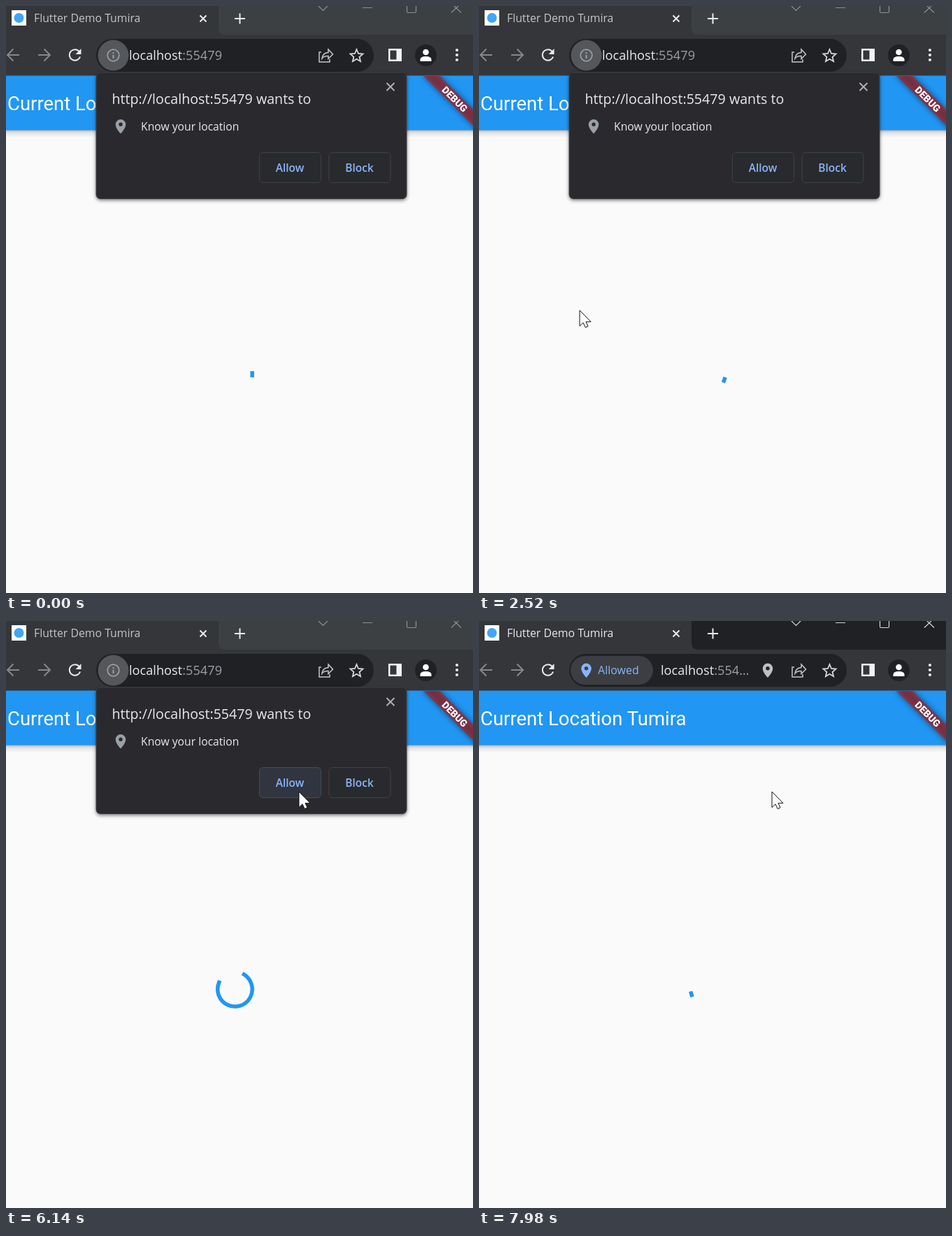
An HTML page that plays this animation: 668 px wide and 839 px high, repeating every 8000 ms.

```html
<!DOCTYPE html>
<html lang="en">
<head>
<meta charset="utf-8">
<title>Location permission</title>
<style>
  html, body { margin: 0; width: 100%; height: 100%; overflow: hidden; background: #fafafa; }
  svg { display: block; width: 668px; height: 839px; }
  text { font-family: "Open Sans", "Noto Sans", sans-serif; }
  .app { font-family: Roboto, sans-serif; fill: #fff; }
  .line { fill: none; stroke: #e8eaed; stroke-width: 2; }
  .dim { stroke: #85878b; }
  .button { fill: #292a2d; stroke: #3f4246; }
  .label { fill: #8ab4f8; font-size: 15.5px; font-weight: 600; text-anchor: middle; }
  .url { font-size: 18.2px; fill: #e8eaed; }
  .port { fill: #9aa0a6; }
  .strip { fill: #3c4043; }
  .tab { font-size: 15.8px; fill: #c3c5c8; }
  .control { stroke: #8d9094; stroke-width: 1.2; }
  .focused .strip { fill: #202124; }
  .focused .tab { fill: #e8eaed; }
  .focused .control { stroke: #d5d6d8; }
  .hover .allow { fill: #30353f; stroke: #454d5b; }
  .focused .asking, svg:not(.focused) .granted { display: none; }
</style>
</head>
<body>
<svg id="stage" viewBox="0 0 668 839">
  <defs>
    <filter id="soft" x="-30%" y="-80%" width="160%" height="260%"><feGaussianBlur stdDeviation="4.5"/></filter>
    <filter id="drop" x="-5%" y="-10%" width="110%" height="125%">
      <feDropShadow dx="0" dy="2" stdDeviation="2.5" flood-opacity=".5"/>
    </filter>
    <linearGradient id="barShadow" x2="0" y2="1">
      <stop stop-color="#000" stop-opacity=".3"/>
      <stop offset=".35" stop-color="#000" stop-opacity=".1"/>
      <stop offset="1" stop-color="#000" stop-opacity="0"/>
    </linearGradient>
    <clipPath id="page"><rect y="100" width="668" height="739"/></clipPath>
    <path id="pin" fill-rule="evenodd" d="M0-10a7.3 7.3 0 0 0-7.3 7.3C-7.3 3 0 10.500 0 10.500S7.300 3 7.300-2.700A7.300 7.300 0 0 0 0-10ZM0-5.500a2.700 2.700 0 1 1 0 5.400a2.700 2.700 0 0 1 0-5.400Z"/>
  </defs>

  <!-- App page -->
  <rect width="668" height="839" fill="#fafafa"/>
  <rect y="177" width="668" height="11" fill="url(#barShadow)"/>
  <rect y="99" width="668" height="78.500" fill="#2196f3"/>
  <text class="app" x="2" y="149" font-size="27.5">Current Location Tumira</text>
  <g clip-path="url(#page)">
    <g transform="translate(675 100) rotate(45)">
      <rect x="-55" y="38.500" width="110" height="16.500" opacity=".5" filter="url(#soft)"/>
      <rect x="-55" y="38.500" width="110" height="16.500" fill="#b71c1c" fill-opacity=".63"/>
      <text class="app" y="51.800" font-size="14" font-weight="900" text-anchor="middle">DEBUG</text>
    </g>
  </g>
  <path id="spinner" fill="none" stroke="#2196f3" stroke-width="5.500" stroke-linecap="square"/>

  <!-- Tab strip -->
  <rect width="668" height="99.500" fill="#35363a"/>
  <path class="strip" d="M304 0H668V41H314Q304 41 304 31Z"/>
  <rect x="8" y="6" width="21" height="22" fill="#fff"/>
  <circle cx="18.500" cy="17" r="7" fill="#42a5f5"/>
  <text class="tab" x="40" y="23">Flutter Demo Tumira</text>
  <path class="line" d="M277.500 13.500l9 9m0-9l-9 9M327 18h15M334.500 10.500v15"/>
  <path class="line control" d="M447 0l6.500 6.500L460 0M510 2.500h14M573.500 0v8q0 1.500 1.500 1.500h10q1.500 0 1.500-1.500v-8M637 9.500L647 0M651 9.500L641 0"/>

  <!-- Toolbar -->
  <path class="line dim" d="M19 70H2m8.500-8.500L2 70l8.500 8.500M46 70h17m-8.500-8.500L63 70l-8.500 8.500"/>
  <path class="line" d="M105 65.500A7.800 7.800 0 1 0 106 72.500"/>
  <path d="M107.500 61v8h-8Z" fill="#e8eaed"/>
  <rect x="129" y="47" width="397" height="47" rx="23.500" fill="#202124"/>
  <g class="asking">
    <circle cx="153.500" cy="70.500" r="22" fill="#55575a"/>
    <circle class="line" cx="153.500" cy="70.500" r="8.300" style="stroke:#9aa0a6;stroke-width:1.7"/>
    <path class="line" d="M153.500 66v2m0 1.700v5.300" style="stroke:#9aa0a6"/>
    <text class="url" x="176" y="77">localhost<tspan class="port">:55479</tspan></text>
  </g>
  <g class="granted">
    <rect x="131" y="50" width="118" height="41" rx="20.500" fill="#3c3e43"/>
    <use href="#pin" x="153.500" y="70.500" fill="#8ab4f8"/>
    <text x="170" y="76" font-size="16" font-weight="500" fill="#8ab4f8">Allowed</text>
    <text class="url" x="260" y="77">localhost<tspan class="port">:554…</tspan></text>
    <use href="#pin" x="413" y="70.500" fill="#bdc1c6"/>
  </g>
  <path class="line" d="M451 66h-3v14h15v-4M452 75q1-8 9-8.500v-4.500l6.500 7-6.500 6.500v-4q-6-.5-9 3.500Z" style="stroke:#c4c7ca;stroke-width:1.5"/>
  <path id="star" class="line" style="stroke:#d5d7da;stroke-width:1.8"/>
  <path d="M547 61h19v18h-19Zm2.500 2.500v13h9v-13Z" fill="#f1f3f4" fill-rule="evenodd"/>
  <circle cx="600.500" cy="70.500" r="15.500" fill="#202124"/>
  <circle cx="600.500" cy="66" r="4.300" fill="#fff"/>
  <path d="M592.500 79v-2.500q0-4.500 8-4.500t8 4.500v2.500Z" fill="#fff"/>
  <path d="M645 63v0m0 7v0m0 7v0" stroke="#e8eaed" stroke-width="4.200" stroke-linecap="round"/>

  <!-- Permission prompt -->
  <g class="asking">
    <rect x="129" y="95" width="444" height="180.500" rx="6" fill="#292a2d" stroke="#3c3e42" filter="url(#drop)"/>
    <path class="line" d="M544.500 110l11 11m0-11l-11 11" style="stroke:#aeb1b5"/>
    <text x="151.500" y="140" font-size="19.650" fill="#e8eaed">http://localhost:55479 wants to</text>
    <use href="#pin" x="164" y="172" fill="#9aa0a6"/>
    <text x="193" y="178" font-size="15.700" fill="#e8eaed">Know your location</text>
    <rect class="button allow" x="362.500" y="209.500" width="88" height="43" rx="5"/>
    <rect class="button" x="462" y="209.500" width="88" height="43" rx="5"/>
    <text class="label" x="406" y="236.500">Allow</text>
    <text class="label" x="505.500" y="236.500">Block</text>
  </g>

  <path id="cursor" d="M0 0V22.500L5 17.700L8.200 24.500L12 22.800L9 16.300H16Z" fill="#fff" stroke="#111"/>
</svg>
<script>
const LOOP = 8000, TICK = 1000 / 15;
const stage = document.getElementById("stage");
const spinner = document.getElementById("spinner");
const cursor = document.getElementById("cursor");

// Screen capture pacing: [ms, tick]
const PACE = [[0, 0], [930, 14], [1760, 26], [2590, 38], [3070, 45], [3270, 48], [4100, 60],
  [4930, 72], [5750, 84], [6140, 90], [6620, 97], [7460, 109], [7980, 117], [8000, 117.3]];

// Pointer tip: [tick, x, y]
const POINTER = [[0, 690, 860], [18, 690, 860], [19, 655, 825], [20, 530, 758], [21, 424, 582],
  [22, 394, 508], [23, 392, 502], [30, 392, 502], [32, 277, 476], [34, 199, 448], [37, 144, 435],
  [38, 112, 428], [39, 77, 425], [41, 24, 424], [45, -2, 425], [51, -2, 427], [63, 1, 428],
  [65, 20, 424], [66, 175, 338], [67, 332, 280], [68, 440, 245], [69, 461, 241], [71, 461, 241],
  [72, 454, 242], [74, 419, 244], [118, 419, 244]];
const HOVER_TICK = 73, GRANT_TICK = 112;

function interpolate(keys, at) {
  const i = Math.max(1, keys.findIndex(key => key[0] > at));
  const [a, b] = [keys[i - 1], keys[i]];
  const k = (at - a[0]) / (b[0] - a[0]);
  return a.slice(1).map((v, n) => v + (b[n + 1] - v) * k);
}

// cubic-bezier(0.4, 0, 0.2, 1)
function ease(x) {
  if (x <= 0) return 0;
  if (x >= 1) return 1;
  let low = 0, high = 1, s;
  for (let i = 0; i < 20; i++) {
    s = (low + high) / 2;
    const u = 1 - s;
    if (1.2 * s * u * u + 0.6 * s * s * u + s ** 3 < x) low = s; else high = s;
  }
  return s * s * (3 - 2 * s);
}

function polar(cx, cy, radius, degrees) {
  const a = degrees * Math.PI / 180;
  return `${(cx + radius * Math.cos(a)).toFixed(2)} ${(cy + radius * Math.sin(a)).toFixed(2)}`;
}

function spinnerPath(ms) {
  const phase = (0.053 + ms / 1333) % 1;
  const turn = 0.2256 + ms / 2222;
  const head = ease(phase * 2), tail = ease(phase * 2 - 1);
  const start = -90 + 360 * turn + 90 * phase + 270 * tail;
  const sweep = Math.max(270 * (head - tail), 0.1);
  const point = angle => polar(327.5, 526.3, 24.75, angle);
  return `M${point(start)}A24.75 24.75 0 ${sweep > 180 ? 1 : 0} 1 ${point(start + sweep)}`;
}

function render(ms) {
  let tick = Math.floor(interpolate(PACE, ms)[0] + 0.05);
  if (tick > 45 && tick < 48) tick = 45;
  spinner.setAttribute("d", spinnerPath(tick * TICK));
  cursor.setAttribute("transform", `translate(${interpolate(POINTER, tick)})`);
  stage.classList.toggle("hover", tick >= HOVER_TICK);
  stage.classList.toggle("focused", tick >= GRANT_TICK);
}

const starPoints = Array.from({ length: 10 }, (_, i) => polar(501.5, 71.5, i % 2 ? 4.3 : 9.5, i * 36 - 90));
document.getElementById("star").setAttribute("d", `M${starPoints.join("L")}Z`);

const began = performance.now();
function loop() {
  render((performance.now() - began) % LOOP);
  requestAnimationFrame(loop);
}
loop();
</script>
</body>
</html>
```
